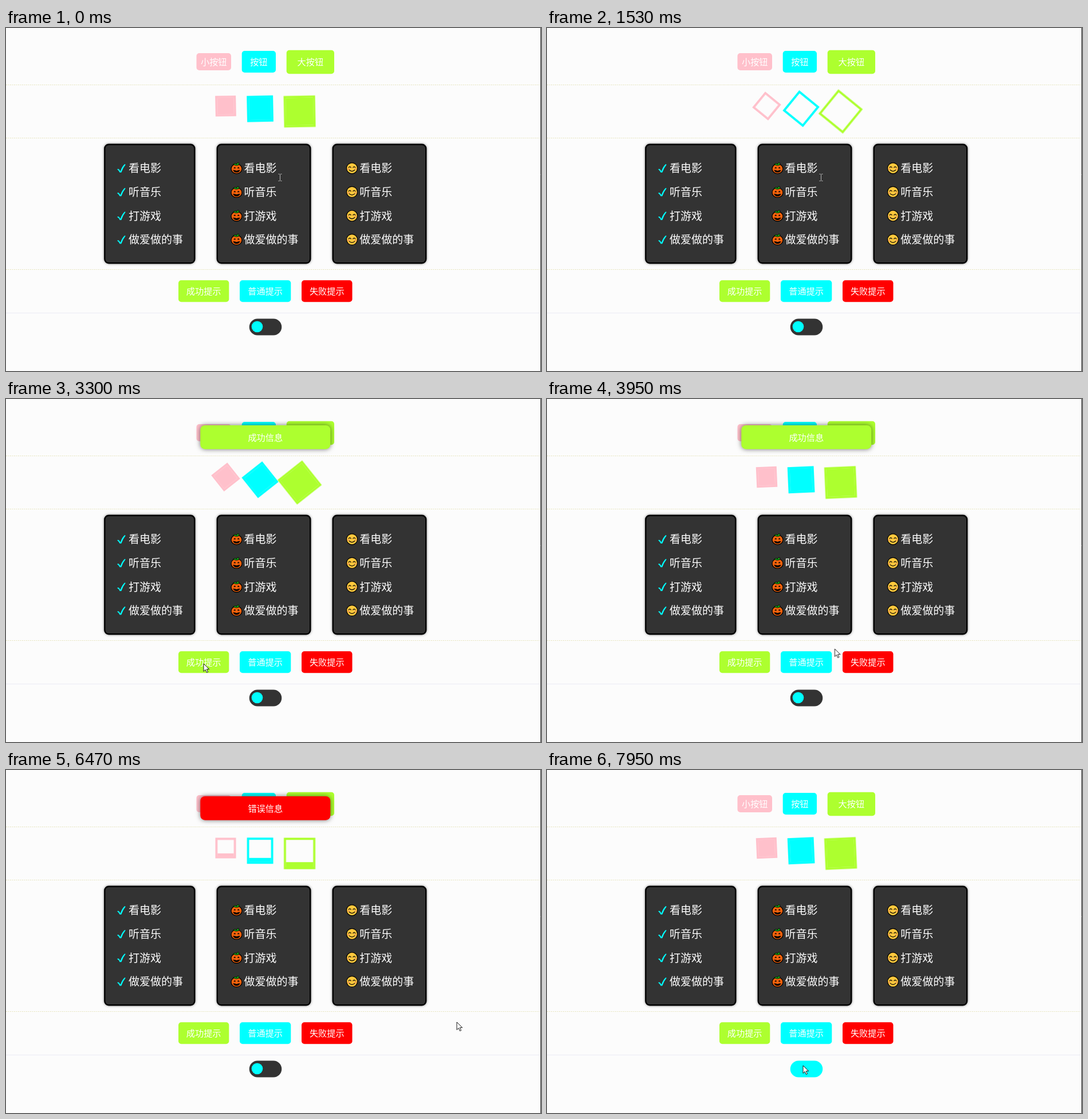
An HTML page for the animation above (8000 ms loop, 934 by 600 pixels).

```html
<!DOCTYPE html>
<html lang="zh">
<head>
<meta charset="utf-8">
<title>组件演示</title>
<style>
html, body { margin: 0; width: 100%; height: 100%; overflow: hidden; background: #fcfcfc; }
svg { display: block; width: 934px; height: 600px; }
text { font: 15.2px "Noto Sans CJK SC", "Noto Sans CJK", sans-serif; fill: #fff; text-anchor: middle; }
.item { font-size: 19px; text-anchor: start; }
.card { fill: #333; stroke: #000; stroke-width: 2.4; filter: drop-shadow(0 0 2px rgba(0,0,0,.45)); }
.banner { opacity: 0; }
.banner rect { filter: drop-shadow(0 0 4px rgba(0,0,0,.55)); }
</style>
</head>
<body>
<svg id="stage" viewBox="0 0 934 600">
  <defs>
    <path id="check" fill="#0ff" d="M-7 2q2-1.6 3.4 0l2.3 3.2q3-8.500 7.600-12.400l1.400.8q-4.800 6-7.400 13.800h-2.700q-1.800-4-4.600-5.400z"/>
    <g id="pumpkin">
      <ellipse cy="1" rx="9.500" ry="8.500" fill="#f7630c" stroke="#000" stroke-width="1.300"/>
      <path d="M-6-7q4-3 6 0l2-3 2.500 1-1 3.500q-5 2-9.500-1.500z" fill="#16a515" stroke="#000" stroke-width=".8"/>
      <path d="M-5.500 0l3-2.500.8 3zM5.500 0l-3-2.500-.8 3zM-6.500 2.500l2 1.200 1.500-.7 1.500 1.200h3l1.500-1.200 1.500.7 2-1.200q-1.500 5-6.500 5t-6.500-5z"/>
    </g>
    <g id="smile">
      <circle r="9.500" fill="#ffc83d" stroke="#000" stroke-width="1.200"/>
      <path d="M-5.800-1.200q2-3 4 0M1.800-1.200q2-3 4 0M-4.800 3q4.800 4.500 9.600 0" fill="none" stroke="#000" stroke-width="1.200" stroke-linecap="round"/>
      <path d="M-7 1.500h2M5 1.500h2" stroke="#f58a5b" stroke-width="1.600" stroke-linecap="round"/>
    </g>
  </defs>
  <g id="page"></g>
  <rect id="toggle" x="424.700" y="508.500" width="56.600" height="29" rx="14.500" fill="#333"/>
  <circle cx="438.500" cy="522.500" r="9.800" fill="#0ff"/>
  <g id="banners"></g>
  <path d="M933.500 0v600" stroke="#333"/>
  <g id="cursor">
    <path id="beam" d="M-2.500-5.500h2l1 1 1-1h2M.5-4.500v10M-2.500 6.500h2l1-1 1 1h2" fill="none" stroke="#bbb"/>
    <path id="arrow" d="M0 0v13.500l3.100-3 2.300 5 2.200-1-2.300-4.800h4.400z" fill="#fff" stroke="#000" stroke-width=".9"/>
  </g>
</svg>
<script>
const LOOP = 8000, SPIN = 4000, SPIN_START = 1105;
const PINK = '#ffc0cb', CYAN = '#0ff', LIME = '#adff2f', RED = '#f00';
const $ = id => document.getElementById(id);
const add = (id, markup) => $(id).insertAdjacentHTML('beforeend', markup);

const button = (x, y, w, h, color, label, r = 5) =>
  `<rect x="${x}" y="${y}" width="${w}" height="${h}" rx="${r}" fill="${color}"/>
   <text x="${x + w / 2}" y="${y + h / 2 + 5.7}">${label}</text>`;

[[99, 1], [192, 1], [422, 1], [498, 0]].forEach(([y, dashed]) => add('page',
  `<path d="M0 ${y + .5}H932" stroke="${dashed ? '#e6e4bd' : '#ebebf5'}" ${dashed ? 'stroke-dasharray="2 1.5"' : ''}/>`));

[[332.5, 44, 60.5, 30, PINK, '小按钮'],
 [411.7, 40, 59.3, 38, CYAN, '按钮'],
 [489.7, 38.7, 83.3, 41.5, LIME, '大按钮'],
 [301, 441.3, 88.3, 38, LIME, '成功提示'],
 [408, 441.3, 89.3, 38, CYAN, '普通提示'],
 [516, 441.3, 88.5, 38, RED, '失败提示']].forEach(b => add('page', button(...b)));

// Each loader: centre x, centre y, side, colour.
[[383.5, 136.5, 36, PINK], [443.6, 141.2, 45.8, CYAN], [512.6, 146, 55, LIME]].forEach(([x, y, side, color]) => {
  const edge = 3.8, inner = side - 2 * edge;
  add('page', `<g transform="translate(${x} ${y})"><g class="spin">
    <rect x="${(edge - side) / 2}" y="${(edge - side) / 2}" width="${side - edge}" height="${side - edge}"
      fill="none" stroke="${color}" stroke-width="${edge}"/>
    <g transform="translate(0 ${-inner / 2 - .4})">
      <rect class="level" x="${-inner / 2 - .4}" width="${inner + .8}" height="${inner + .8}" fill="${color}"/>
    </g></g></g>`);
});

const items = ['看电影', '听音乐', '打游戏', '做爱做的事'];
[[172.3, 157, 'check', 201, 214], [368.8, 162.5, 'pumpkin', 402.5, 415.5], [570.7, 162.5, 'smile', 604, 617.3]]
  .forEach(([x, w, icon, iconX, textX]) => {
    add('page', `<rect class="card" x="${x}" y="203.800" width="${w}" height="207.500" rx="7"/>`);
    items.forEach((label, i) => {
      const y = 245.3 + i * 41.6;
      add('page', `<use href="#${icon}" x="${iconX}" y="${y}"/><text class="item" x="${textX}" y="${y + 7}">${label}</text>`);
    });
  });

[['success', LIME, '成功信息'], ['failure', RED, '错误信息']].forEach(([id, color, label]) =>
  add('banners', `<g class="banner" id="${id}">${button(339.3, 46, 227, 41.7, color, label, 8)}</g>`));

const spinOptions = { duration: SPIN, delay: SPIN_START - SPIN, iterations: Infinity };
const cycle = (selector, values, easing) => document.querySelectorAll(selector).forEach(el =>
  el.animate(values.map(transform => ({ transform, easing })), spinOptions));
cycle('.spin', [0, 180, 180, 360, 360].map(a => `rotate(${a}deg)`), 'ease');
cycle('.level', [0, 0, 1, 1, 0].map(s => `scaleY(${s})`), 'ease-in');

// Plays a table of [ms, value] steps over the whole loop.
const play = (id, prop, steps, easing = 'linear') => {
  const last = steps[steps.length - 1][1];
  $(id).animate([...steps, [LOOP, last]].map(([ms, value]) => ({ offset: ms / LOOP, [prop]: value, easing })),
    { duration: LOOP, iterations: Infinity });
};
const HARD = 'steps(1, end)';

play('success', 'opacity', [[0, 0], [3050, 0], [3250, 1], [4700, 1], [4800, 0]]);
play('failure', 'opacity', [[0, 0], [4500, 0], [4700, 1], [6900, 1], [7100, 0]]);
play('toggle', 'fill', [[0, '#333'], [7400, CYAN]], HARD);
play('beam', 'opacity', [[0, 1], [2150, 0]], HARD);
play('arrow', 'opacity', [[0, 0], [2150, 1]], HARD);
play('cursor', 'transform', [
  [0, 478, 261], [2000, 478, 261], [2510, 604, 319], [2600, 574, 349], [2950, 345, 463],
  [3450, 345, 463], [3950, 502, 437], [4190, 578, 463], [5080, 570, 463], [5350, 711, 444],
  [5600, 787, 441], [6900, 787, 441], [7350, 450, 520], [7950, 447, 517]
].map(([ms, x, y]) => [ms, `translate(${x}px, ${y}px)`]));
</script>
</body>
</html>
```
